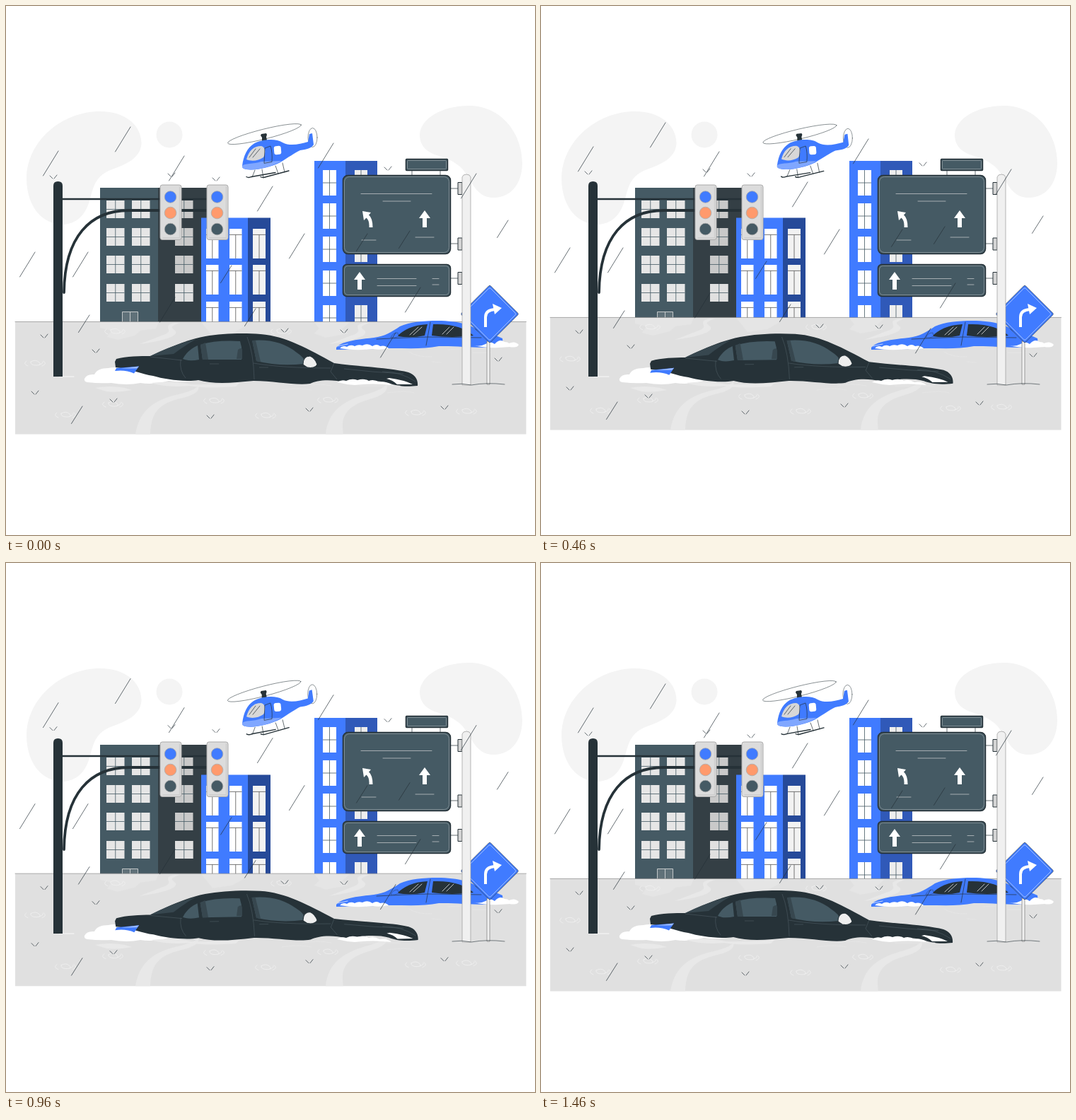
An HTML page that plays this animation: 748 by 748 pixels, repeating every 1500 ms.

```html
<!DOCTYPE html>
<html lang="en">
<head>
<meta charset="utf-8">
<title>Flooded street</title>
<style>
  html, body { margin: 0; width: 100%; height: 100%; overflow: hidden; background: #fff }
  svg { display: block; width: 100vw; height: 100vh }
  .blue { fill: #407bff } .dark { fill: #263238 } .slate { fill: #455a64 }
  .white { fill: #fff } .pale { fill: #e0e0e0 }
  .line { fill: none; stroke: #263238; stroke-width: .7; stroke-linecap: round }
  .light { fill: none; stroke: #e6e6e6; stroke-width: .8; stroke-linecap: round }
</style>
</head>
<body>
<svg viewBox="0 0 748 748">
  <g fill="#f4f4f4">
    <path d="M133 149C170 149 192 170 191.500 195C190 215 170 224 150 231C128 239 124 253 119 272C113 296 100 308 80 309C48 308 29 280 29 243C30 190 80 149 133 149Z"/>
    <circle cx="231" cy="182" r="18.500"/>
    <path d="M655 141C700 141 730 180 730 222C730 252 713 271 690 271C668 271 662 255 652 240C645 226 630 217 612 212C595 207 585 198 585 182C586 160 615 141 655 141Z"/>
  </g>

  <g id="buildings">
    <path class="slate" d="M133 257h82v192h-82z"/>
    <path fill="#343f45" d="M215 257h69v192h-69z"/>
    <path class="blue" d="M276 299.500h66v150h-66z"/>
    <path fill="#264a99" d="M342 299.500h32v150h-32z"/>
    <path class="blue" d="M436 219h44v230h-44z"/>
    <path fill="#3059b8" d="M480 219h45v230h-45z"/>
    <path fill="#607179" stroke="#e0e0e0" stroke-width=".8" d="M164.500 449v-16.500h22V449M175.500 433v16"/>
  </g>

  <g id="helicopter">
    <ellipse class="line" cx="365.500" cy="181" rx="53.500" ry="7" transform="rotate(-14 365.500 181)" style="stroke-width:.5"/>
    <ellipse class="line" cx="433.500" cy="186" rx="6.500" ry="13.500" style="stroke-width:.5"/>
    <path class="dark" d="M361 181l7-1 1 2-1 3 1 5-7 1 0-5-2-3z"/>
    <path class="blue" d="M334 226C336 211 341 201 350 195C362 188 382 187 391 193C402 199 416 195 427 192L429 181L433 180L435 196C432 201 425 203 416 204C408 208 399 214 388 221C374 228 352 233 340 231Q333 230 334 226Z"/>
    <path fill="#80a7ff" d="M334 226C337 222 350 224 361 220L390 219C376 227 355 233 340 231Q333 230 334 226Z"/>
    <path fill="#d7d7d7" d="M340 217C343 205 350 198 361 198C368 200 367 209 364 214C357 219 347 220 340 217Z"/>
    <path class="line" d="M365 222L366 201L374 198Q377 207 376 220ZM344 214l9-12M349 214l10-12M352 232l-4 10M362 231l2 12M381 226l4 11M391 222l3 13"/>
    <rect x="379" y="198" width="10" height="12" rx="3" fill="#fff" transform="rotate(-5 384 204)"/>
    <path class="line" style="stroke-width:1.400" d="M340 241.500Q343 243.500 347 241.500L381 235.500M360 241.500Q363 243.500 368 241.500L400 233"/>
  </g>

  <g id="water">
    <path class="pale" d="M13 446.500H735.500V605.500H13Z"/>
    <path fill="#e5e5e5" d="M133 447h83l-4 9-22 3-8 7-24 6-15-4 6-9-16-4zM276 447h66l-8 8-14 8-28 4-7-9zM436 447h50l-11 10 9 6-32 6-16-6 7-7z"/>
    <path fill="#e8e8e8" d="M183 605.500C188 577 203 559 240 550Q267 544 272 537Q276 549 242 556C214 564 205 577 204 605.500ZM452 605.500C455 577 472 560 506 550Q532 543 538 535Q543 548 514 556C484 565 472 578 477 605.500Z"/>
    <path id="stream" fill="#e8e8e8" d="M238 448C217 453 243 459 220 466L189 478C218 474 243 468 240 460C235 455 229 454 246 448Z"/>
    <use href="#stream" x="268"/>
    <path class="line" style="stroke:#8a8a8a" d="M13 446.500H735.500"/>
    <g id="ripples"></g>
  </g>

  <g id="blueCar">
    <path class="light" d="M570 489Q582 497 602 496M602 503l13 1M625 486l28-2M660 490h25"/>
    <path class="blue" d="M467 483C472 476 490 472 520 469C536 467 545 461 557 453C570 447 590 445 610 445C640 445 661 451 674 463Q691 464 702 470L703 480C680 486 640 480 612 481C584 487 550 482 522 485L467 486Z"/>
    <path class="dark" d="M553 467C562 458 575 451 596 450L592 466Q574 470 553 467ZM604 450C630 449 650 455 661 466Q630 470 602 466Z"/>
    <path class="light" d="M571 465l12-11M576 465l12-11M617 464l10-10M623 464l10-10"/>
    <path class="line" d="M600 447L594 480M524 471Q560 469 596 468L672 469M664 457l12 9"/>
    <path class="blue" d="M544 469q3-7 10-7l1 5q-5 3-11 2z" stroke="#263238" stroke-width=".4"/>
    <path class="white" d="M472 484q4-5 10-2q5-4 11-1q5-3 11-1q8-4 14 1q6-4 11 0q7-2 12 3q-12 3-22 1q-25 3-47-1zM660 480q11 2 18-2q7-5 13 0q7-8 14-3q5 0 6 2q9-4 14 2q-2 5-13 3q-28 3-52-2z"/>
    <path class="line" d="M469 481l14-3" style="stroke:#fff"/>
  </g>

  <path class="white" d="M111 527Q114 520 125 521Q129 512 145 512Q156 509 165 514Q180 511 196 518Q220 519 231 523Q252 525 272 529Q250 533 230 530Q208 536 190 533Q171 537 149 533Q132 534 115 532Q110 531 111 527Z"/>
  <path fill="#e9e9e9" d="M205 533q30-4 55 2q28 1 70-2l-5 5q-46 3-66-1q-30 3-54-4zM126 540q20-4 42 0l10 3q-20 4-36 2z"/>
  <g id="blackCar">
    <path class="dark" d="M154 503L156 499C170 495 190 495 204 495C225 486 250 473 282 467C305 463 335 462 360 464C397 467 427 485 464 505C500 510 545 512 569 518C578 521 583 528 582 537C563 539 551 537 541 533C523 528 500 530 481 533C460 527 440 529 430 534C410 537 380 530 350 530C320 533 293 535 272 529C254 532 225 528 208 523C192 521 177 513 155 511Z"/>
    <path class="blue" d="M156 512L188 509.500L181 519.500Q169 514 154 516Z"/>
    <path fill="#9dbcff" d="M162 512.500l26-3-3 3z"/>
    <path fill="#37474f" d="M204 495Q234 480 269 471Q251 481 237 492Z"/>
    <path class="slate" d="M250 499Q257 486 271 480L273 500Q259 503 250 499ZM275 479Q297 472 331 474Q335 486 333 500L278 500ZM348 473Q386 470 411 490Q425 499 421 506Q387 510 354 502Z"/>
    <path fill="#37474f" d="M275 479l7-3 4 24h-8zM328 486q5-4 6 0v13h-8zM348 473l5 0 7 30-6-1z"/>
    <path d="M341 468Q350 490 351 528M247 500Q245 516 254 526M204 496l45 5M350 505Q390 512 459 512M464 505L459 517 468 528M288 506h13M358 511h13M478 513Q520 518 562 520M532 517Q558 517 579 531" fill="none" stroke="#4d5c63" stroke-width=".6"/>
    <path d="M420 507Q420 495 430 495Q437 498 440 507Q436 513 426 511Z" fill="#eee" stroke="#263238"/>
    <path class="white" d="M542 526Q564 529 575 535L553 535Q547 529 538 527Z"/>
  </g>
  <path class="white" d="M468 532Q474 528 481 530Q489 526 497 529Q506 526 513 530Q520 527 528 532Q538 530 545 536Q520 533 493 536Q480 535 468 532Z"/>
  <path class="light" d="M500 537h57M539 547q26-4 38 0M390 543q25-4 42 0M420 537q20-4 40 0"/>

  <g id="trafficLights">
    <path class="light" style="stroke:#fff" d="M75 524H96"/>
    <path class="dark" d="M67 524V254Q67 248 73.500 248Q80 248 80 254V524Z"/>
    <path class="line" style="stroke-width:2.700" d="M80 273H288"/>
    <path class="line" style="stroke-width:3.800" d="M82 405C83 326 119 289 174 289H288"/>
    <g id="lamp">
      <rect x="218" y="253" width="30" height="77.500" rx="3" fill="#dcdcdc" stroke="#aaa"/>
      <path d="M245.500 255v73h-24" fill="none" stroke="#cdcdcd" stroke-width="1.500"/>
      <g stroke="#a9a9a9" stroke-width=".8">
        <circle cx="232.500" cy="270" r="8.300" class="blue"/>
        <circle cx="232.500" cy="292.500" r="8.300" fill="#ff9a6c"/>
        <circle cx="232.500" cy="315.500" r="8.300" class="slate"/>
      </g>
    </g>
    <use href="#lamp" x="66"/>
  </g>

  <g id="signs">
    <path d="M680 474h4v61h-4z" fill="#f0f0f0" stroke="#777" stroke-width=".7"/>
    <g transform="rotate(45 684 435.500)">
      <rect x="655" y="406.500" width="58" height="58" rx="2" fill="#407bff" stroke="#263238" stroke-width=".6"/>
      <rect x="657.500" y="409" width="53" height="53" rx="2" fill="none" stroke="#dce7ff" stroke-width=".6"/>
    </g>
    <path d="M678 454V440Q678 430 691 429" fill="none" stroke="#fff" stroke-width="4"/>
    <path class="white" d="M688 421l13 6-10 9z"/>
    <path class="line" d="M629 258h10M629 336h10M629 385h10M574 233v6M614 233v6"/>
    <path fill="#d5d5d5" stroke="#263238" d="M639 249.500h6v17h-6zM639 328h6v17h-6zM639 376.500h6v17h-6z"/>
    <path d="M645 536V242Q646 238 651 238Q656 238 657 242V536Z" fill="#f0f0f0" stroke="#999" stroke-width=".7"/>
    <path class="line" style="stroke-width:.6" d="M631 535Q645 533 658 536Q680 532 705 535"/>
    <g id="boards"></g>
    <path class="white" d="M504 290L516 292L513 295.500Q518.500 300 518.500 313H513.500Q514 303 509.500 299.500L506 303ZM592 289l-8 11h5v13h6v-13h5zM500 376l-8 11h5v14h6v-14h5z"/>
    <path class="light" style="stroke-width:.6" d="M502 265.500h100M533 276h39M503 331h20M579 327h26M525 385.500h55M525 395.500h55M603 385.500h9M603 394h9"/>
  </g>

  <g id="rain" class="line"></g>
</svg>
<script>
const $ = id => document.getElementById(id);
const add = (id, markup) => $(id).insertAdjacentHTML('beforeend', markup);
const path = (d, attrs = '') => `<path d="${d}" ${attrs}/>`;
const pairs = text => text.split(' ').map(p => p.split(',').map(Number));

function windows(xs, ys, w, h, fill, bar, cross) {
  for (const x of xs) for (const y of ys) {
    add('buildings', path(`M${x} ${y}h${w}v${h}h${-w}z`, `fill="${fill}"`) +
      path(`M${x} ${y + h * cross}h${w}M${x + w / 2} ${y + (cross < .4 ? h * cross : 0)}V${y + h}`,
        `stroke="${bar}" stroke-width=".8"`));
  }
}
const greyRows = [275, 314, 353, 393];
const tallRows = [315, 366, 418];
const blueRows = [232, 279, 326, 374, 423];
windows([142, 178], greyRows, 25.5, 25, '#e6e6e6', '#455a64', .5);
windows([239], greyRows, 25.5, 25, '#c9c9c9', '#455a64', .5);
windows([239], [393], 25.5, 25, '#e0e0e0', '#455a64', .5);
windows([283, 316], tallRows, 17.5, 42, '#fff', '#555', .2);
windows([349], tallRows, 18, 42, '#f2f2f2', '#555', .2);
windows([448], blueRows, 19, 36, '#fff', '#455a64', .5);
windows([493], blueRows, 18, 36, '#eee', '#455a64', .5);

for (const [x, y, w, h, r] of [[476, 239, 153, 112, 7], [476, 365, 153, 46, 5], [565, 216, 60, 17, 1]]) {
  const rect = (inset, style) => `<rect x="${x + inset}" y="${y + inset}" width="${w - 2 * inset}" ` +
    `height="${h - 2 * inset}" rx="${r}" ${style}/>`;
  add('boards', rect(.5, 'fill="#455a64" stroke="#263238" stroke-width="1.5"') +
    rect(2.5, 'fill="none" stroke="#a5afb3" stroke-width=".6"'));
}

for (const [x, y] of pairs('295,558 368,579 456,557 580,575 652,573 85,578 152,563 42,505 155,460 390,460 600,462')) {
  add('ripples', path(`M${x - 13} ${y - 3}q-6 4 2 7M${x + 11} ${y - 3}q6 4-2 7M${x - 7} ${y - 2}q7-4 12 1q4 4-4 4q-9 0-8-5` +
    `M${x + 5} ${y + 2}q6-1 5-4`, 'class="light" style="stroke:#f0f0f0"'));
}

// Rain streaks by their upper end, and splashes by their foot.
const streaks = '74,205 176,171 252,212 463,194 377,255 422,322 41,348 116,348 586,398 551,462 239,412 665,237';
const shortStreaks = '710,303 118,437 108,566 319,367 353,428 571,318 511,322';
const drops = (list, dx, dy) => pairs(list).forEach(([x, y]) => add('rain', path(`M${x} ${y}l${dx} ${dy}`)));
drops(streaks, -21.5, 35);
drops(shortStreaks, -15.5, 24.5);
for (const [x, y] of pairs('67,244 234,241 297,247 540,232 54,469 127,490 394,461 478,462 41,549 152,560 289,583 429,573 620,570 696,502')) {
  add('rain', path(`M${x - 5} ${y - 4}l4 4M${x + 5} ${y - 5}l-4 5`));
}

const loop = 1500;
function draw() {
  const phase = performance.now() % loop / loop * 2 * Math.PI;
  const swell = (1 - Math.cos(phase)) / 2;
  for (const id of ['water', 'rain']) $(id).setAttribute('transform', `translate(0 ${-9 * swell})`);
  $('blackCar').setAttribute('transform', `rotate(${-1.2 * swell} 345 500)`);
  $('helicopter').setAttribute('transform', `rotate(${.8 * Math.sin(phase)} 372 214)`);
  requestAnimationFrame(draw);
}
draw();
</script>
</body>
</html>
```
